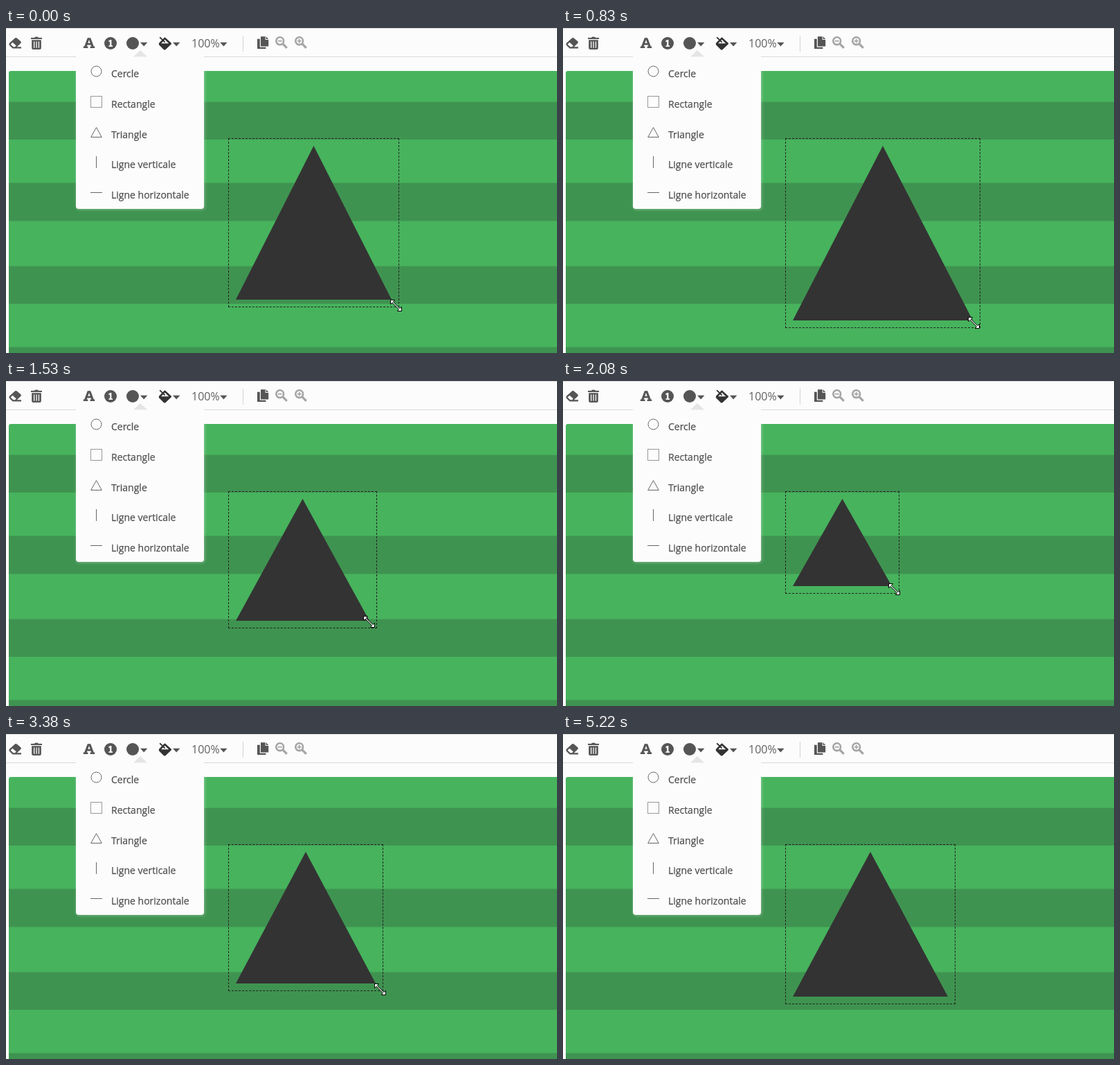
Write an HTML page that moves like this. It is 796 px wide and 469 px high and loops after 5900 ms.

```html
<!DOCTYPE html>
<html lang="fr">
<head>
<meta charset="utf-8">
<title>Redimensionner une forme</title>
<style>
html, body { margin: 0; width: 100%; height: 100%; overflow: hidden; background: #fcfcfc; }
svg { display: block; position: absolute; left: 0; top: 0; }
text { font-family: "Open Sans", sans-serif; }
.menu text { font-size: 14px; fill: #505050; stroke: #505050; stroke-width: .25px; }
.panel { fill: #fcfcfc; filter: drop-shadow(1px 1px 2px rgba(255, 255, 255, .35)); }
.icon { fill: #555; }
.thin { fill: none; stroke: #666; }
.zoom { fill: none; stroke: #a5a5a5; stroke-width: 2.6; }
.stripe { fill: #3f9350; }
.pointer { fill: #fff; stroke: #000; }
#frame { position: absolute; left: 321px; top: 159px; box-sizing: border-box; border: 1px dashed #222; }
</style>
</head>
<body>
<svg width="796" height="469">
  <defs>
    <path id="caret" d="M0 0H10.4L5.2 5.8Z"/>
    <g id="lens">
      <circle cx="6.7" cy="6.7" r="5.4"/>
      <path d="M10.7 10.7L16.8 16.8" stroke-width="3.2"/>
      <path d="M3.8 6.7H9.6" stroke-width="1.7"/>
    </g>
  </defs>

  <path d="M0 .5H796M0 41.5H796" stroke="#d9d9d9"/>

  <!-- toolbar -->
  <g class="icon">
    <path d="M5.2 21.5L13 14.4Q14.3 13.4 15.6 14.4L21.3 19.3Q22.6 20.6 21.3 22L15.8 27.3H22V29.5H9.6L5 25Q3.5 23.2 5.2 21.5ZM10.5 27.3H13L14.8 25.5L9.5 20.8L6.6 23.5Z" fill-rule="evenodd"/>
    <path d="M36 14H41L42 12.7H46L47 14H52V16H36ZM37.2 17.3H50.8V29Q50.8 31 48.8 31H39.2Q37.2 31 37.2 29ZM40 19.5V28.7H41.3V19.5ZM43.4 19.5V28.7H44.7V19.5ZM46.8 19.5V28.7H48.1V19.5Z" fill-rule="evenodd"/>
    <path d="M117.8 14.2H122.2L126.8 26.6H128.2V29H121.6V26.6H123.4L122.6 24.4H117.4L116.6 26.6H118.4V29H111.8V26.6H113.2ZM118.3 21.8H121.7L120 17Z" fill-rule="evenodd"/>
    <circle cx="151" cy="22" r="9"/>
    <path d="M148.4 18.3L150.8 17H152.4V25.2H154V27H148.5V25.2H150.1V19.4L148.4 20.2Z" fill="#fcfcfc"/>
    <circle cx="183" cy="22" r="9"/>
    <use href="#caret" x="194" y="20.8"/>
    <g fill="#333">
      <path d="M228.4 14.2Q229.5 13 230.6 14.2L238.6 21.6Q239.6 22.6 238.6 23.6L230.4 31.2Q229.2 32 228 31.2L221.2 24.4Q220.2 23 221.2 21.6ZM229.6 16.8L224.2 22.3H235.2Z" fill-rule="evenodd"/>
      <path d="M222.2 13.4L229.6 20.6" stroke="#333" stroke-width="2"/>
    </g>
    <use href="#caret" x="241" y="20.8"/>
    <use href="#caret" x="309.2" y="20.8"/>
    <path d="M368 12.3H374.6V17H379.2V26.5H368Z M375.6 12.3L379.2 16H375.6ZM363 15.8H366.8V27.7H375.4V30H363Z"/>
  </g>
  <text x="268" y="28.4" font-size="16" fill="#606060">100%</text>
  <path d="M342.5 11V34" stroke="#d3d3d3"/>
  <g class="zoom">
    <use href="#lens" x="389" y="12"/>
    <use href="#lens" x="417" y="12"/>
    <path d="M423.7 15.8V21.6" stroke-width="1.7"/>
  </g>

  <!-- field -->
  <path d="M4 469V65Q4 62 7 62H796V469Z" fill="#47b35d"/>
  <g class="stripe">
    <rect x="4" y="106.6" width="792" height="54.4"/>
    <rect x="4" y="223.5" width="792" height="55"/>
    <rect x="4" y="343.6" width="792" height="54.4"/>
    <rect x="4" y="460.5" width="792" height="9"/>
  </g>

  <!-- shape menu -->
  <g class="menu">
    <path class="panel" d="M101 41H286V257Q286 261 282 261H105Q101 261 101 257Z"/>
    <path d="M184 41.5L194 32L204 41.5Z" fill="#e5e5e5"/>
    <g class="thin">
      <circle cx="130.5" cy="62.5" r="7.5"/>
      <rect x="122.5" y="98.5" width="16" height="16" stroke="#999"/>
      <path d="M130.5 143.5L138.3 157.5H122.7Z"/>
      <path d="M130.5 185V202M122 237.5H139"/>
    </g>
    <text x="152" y="71">Cercle</text>
    <text x="152" y="115">Rectangle</text>
    <text x="152" y="159">Triangle</text>
    <text x="152" y="202">Ligne verticale</text>
    <text x="152" y="246">Ligne horizontale</text>
  </g>

  <path id="shape" fill="#333"/>
</svg>
<div id="frame"></div>
<svg width="796" height="469">
  <path id="resize" class="pointer" d="M.5.5H6.5L4.5 3.2L13.8 12.5L16.5 10.5V16.5H10.5L12.5 13.8L3.2 4.5L.5 6.5Z"/>
  <path id="arrow" class="pointer" d="M.5.5V16.5L4.2 13L6.7 18.5L9 17.5L6.6 12H11.5Z"/>
</svg>
<script>
const LOOP = 5900, STEP = 139, EARLY = 14;
const GROW = 2820, LEAVE = 4790;
const LEFT = 321, TOP = 159, PAD = 11;
const $ = id => document.getElementById(id);
const shape = $('shape'), frame = $('frame'), resize = $('resize'), arrow = $('arrow');

// key points of the dragged corner: step, x, y
const first = [
  [0, 568, 403], [2, 592, 425], [4.5, 605, 436], [6, 603, 433],
  [8, 584, 410], [11, 536, 357], [14, 492, 313], [17, 483, 303]
];
const second = [[0, 483, 303], [4, 545, 371], [6, 563, 387], [8, 567, 390]];

// smooth curve through the key points, one axis at a time
function curve(keys, n, axis) {
  const last = keys.length - 1;
  n = Math.min(n, keys[last][0]);
  const i = Math.min(keys.findLastIndex(key => key[0] <= n), last - 1);
  const slope = k => {
    const a = keys[Math.max(k - 1, 0)], b = keys[Math.min(k + 1, last)];
    return (b[axis] - a[axis]) / (b[0] - a[0]);
  };
  const [p, q] = [keys[i], keys[i + 1]];
  const span = q[0] - p[0], u = (n - p[0]) / span, v = 1 - u;
  return v * v * ((1 + 2 * u) * p[axis] + u * span * slope(i))
       + u * u * ((1 + 2 * v) * q[axis] - v * span * slope(i + 1));
}

const corner = (keys, n) => [1, 2].map(axis => Math.round(curve(keys, n, axis)));
const steps = (t, start) => Math.floor((t - start + EARLY) / STEP);

function place(node, shown, x, y) {
  node.style.display = shown ? '' : 'none';
  node.setAttribute('transform', `translate(${x} ${y})`);
}

function draw(now) {
  const t = now % LOOP;
  const keys = t < GROW ? first : second;
  const n = steps(t, t < GROW ? 0 : GROW);
  const [right, bottom] = corner(keys, n);
  shape.setAttribute('d',
    `M${(LEFT + right) / 2} ${TOP + PAD}L${right - PAD} ${bottom - PAD}H${LEFT + PAD}Z`);
  frame.style.width = right - LEFT + 'px';
  frame.style.height = bottom - TOP + 'px';

  // the corner trails the pointer by a quarter step
  const [x, y] = corner(keys, n + .25);
  const away = t < LEAVE ? -1 : steps(t, LEAVE);
  const nudge = away === 0 ? 6 : 0;
  place(resize, away < 1, x - 16 + nudge, y - 14 + nudge);
  place(arrow, away > 0, 522 + 69 * away, 366 + 41 * away);
  requestAnimationFrame(() => draw(performance.now()));
}
draw(0);
</script>
</body>
</html>
```
